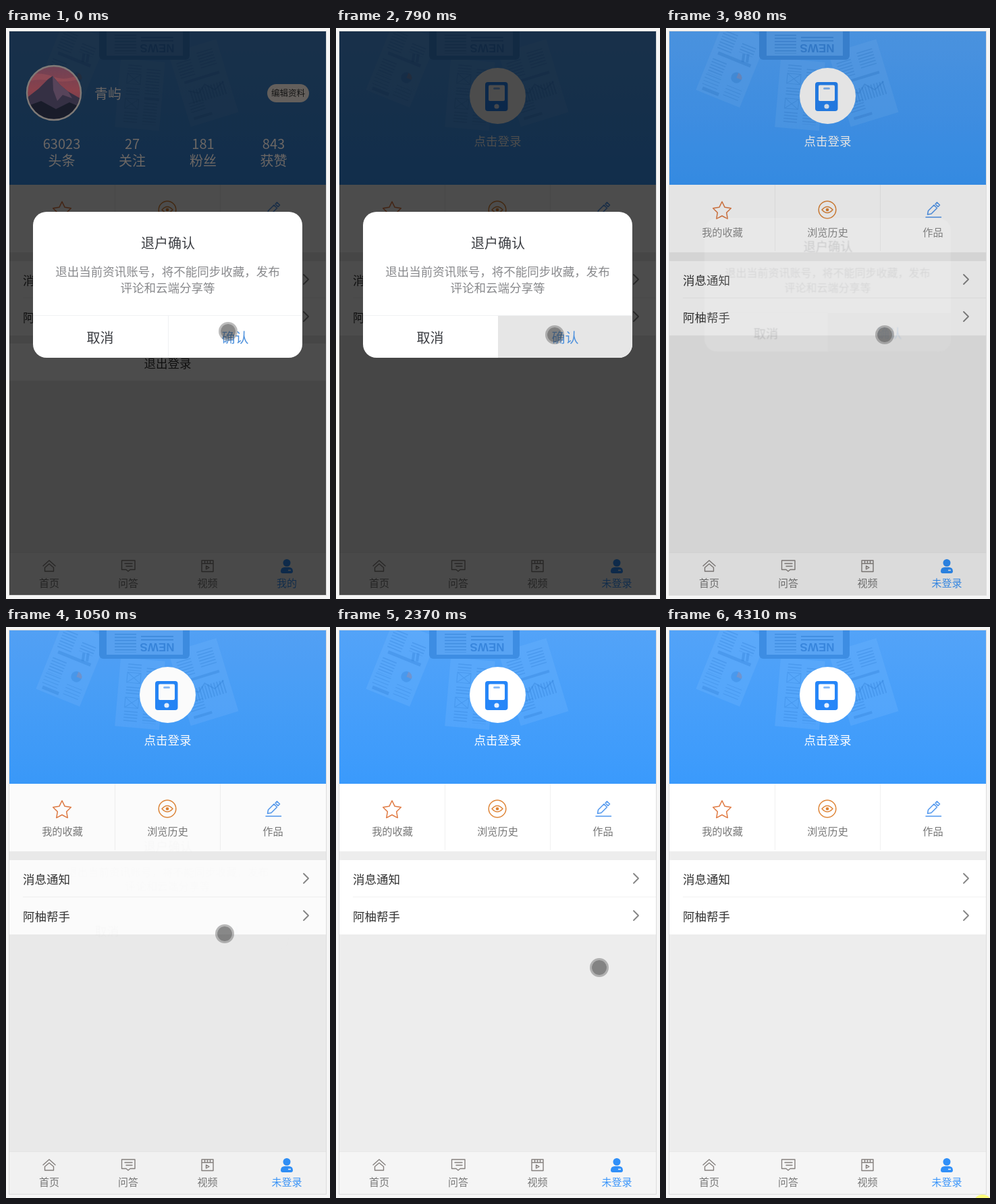
These frames come from a looping animation (480 px wide and 845 px high, 4390 ms). An HTML page:

```html
<!DOCTYPE html>
<html lang="zh-CN">
<head>
<meta charset="utf-8">
<title>Sign out</title>
<style>
html, body { margin: 0; width: 100%; height: 100%; overflow: hidden; background: #f6f6f6; }
svg { display: block; width: 100vw; height: 100vh; }
/* y of every text is its visual middle */
text {
  font-family: "Noto Sans CJK SC", "Noto Sans CJK", "Noto Sans", sans-serif;
  text-anchor: middle; transform: translateY(.38em);
}
.left { text-anchor: start; }
.s12 { font-size: 12.5px; }
.s15 { font-size: 15.2px; }
.tab { font-size: 15px; }
.s17 { font-size: 17.5px; }
.s20 { font-size: 20px; }
.line { fill: none; stroke-width: 1.5; stroke-linejoin: round; stroke-linecap: round; }

.in, .out, .shade, .dialog, .pressed, .cursor, .glow {
  animation: 4390ms step-end infinite;
}
.in { animation-name: signedIn; }
.out { animation-name: signedOut; }
.shade { animation-name: shade; }
.dialog { animation-name: dialog; transform-origin: 239.5px 380px; }
.pressed { animation-name: pressed; }
.cursor { animation-name: cursor; }
.glow { animation-name: glow; }

@keyframes signedIn { 0% { visibility: visible } 17.995%, 100% { visibility: hidden } }
@keyframes signedOut { 0% { visibility: hidden } 17.995%, 100% { visibility: visible } }
@keyframes pressed { 0% { opacity: 0 } 16.628%, 100% { opacity: 1 } }
@keyframes shade {
  0% { opacity: .7 }
  20.045% { opacity: .38 }
  22.323% { opacity: .105 }
  23.917% { opacity: .015 }
  25.056%, 100% { opacity: 0 }
}
@keyframes dialog {
  0% { opacity: 1; transform: none }
  20.045% { opacity: .5; transform: scale(.952) }
  22.323% { opacity: .15; transform: scale(.915) }
  23.917% { opacity: .02; transform: scale(.902) }
  25.056%, 100% { opacity: 0; transform: scale(.9) }
}
@keyframes cursor {
  0% { transform: translate(329px, 449px) }
  1.594% { transform: translate(328px, 450px) }
  3.416% { transform: translate(326px, 452px) }
  6.378% { transform: translate(324px, 454px) }
  53.986% { transform: translate(390px, 504px) }
  55.58% { transform: translate(437px, 539px) }
  57.403%, 100% { transform: translate(-40px, -40px) }
}
@keyframes glow {
  0% { transform: translate(-40px, -40px) }
  86.104% { transform: translate(491px, 842px) }
  87.471% { transform: translate(492px, 843px) }
  89.066% { transform: translate(-40px, -40px) }
  98.177%, 100% { transform: translate(469px, 854px) }
}
</style>
</head>
<body>
<svg viewBox="0 0 480 845" preserveAspectRatio="none">
  <defs>
    <linearGradient id="sky" x2="0" y2="1">
      <stop stop-color="#53a3f8"/><stop offset="1" stop-color="#3a9afc"/>
    </linearGradient>
    <linearGradient id="dusk" x2="0" y2="1">
      <stop stop-color="#6d4256"/><stop offset=".45" stop-color="#8a414b"/><stop offset="1" stop-color="#59394c"/>
    </linearGradient>
    <clipPath id="top"><path d="M5 5H474V232H5z"/></clipPath>
    <clipPath id="face"><circle cx="71" cy="96" r="40"/></clipPath>
    <clipPath id="card"><rect x="40" y="272" width="399" height="216" rx="20"/></clipPath>
    <path id="chevron" class="line" d="M441 -7l7 7l-7 7" stroke="#858585" style="stroke-width:1.8"/>
  </defs>

  <rect width="480" height="845" fill="#f6f6f6"/>
  <rect x="4" y="4" width="471" height="836" fill="#dcdcdc"/>
  <rect x="5" y="5" width="469" height="834" fill="#ededed"/>

  <!-- header backdrop -->
  <g clip-path="url(#top)">
    <rect x="5" y="5" width="469" height="227" fill="url(#sky)"/>
    <g fill="#6fb3fb" fill-opacity=".33" stroke="#2f7fd6" stroke-opacity=".34">
      <g transform="translate(78 8) rotate(22)">
        <rect y="-20" width="70" height="110" stroke="none"/>
        <path d="M17 -8V22M17 37V60" stroke-width="22" stroke-dasharray="1.5 3"/>
        <path d="M10 27H62M8 84H34" stroke-width="5"/>
        <path d="M49 0V14" stroke-width="22" stroke-dasharray="1.5 3"/>
        <path d="M46 14l3 12M52 12l3 12" stroke-width="4"/>
        <path d="M17 62V78M52 66V84" stroke-width="24" stroke-dasharray="1 4"/>
        <circle cx="49" cy="51" r="8" fill="#2f7fd6" fill-opacity=".34" stroke="none"/>
        <path d="M49 51V43A8 8 0 0 1 57 51z" fill="#9a8fb0" fill-opacity=".5" stroke="none"/>
      </g>
      <g transform="translate(170 45) rotate(5)">
        <rect width="66" height="102" stroke="none"/>
        <path d="M12 21h20v15H12zl20 15M32 21L12 36M12 58h20v15H12zl20 15M32 58L12 73" fill="none"/>
        <path d="M22 8V18M22 42V54M22 78V95" stroke-width="20" stroke-dasharray="1.5 3"/>
        <path d="M50 12V50M50 62V94" stroke-width="20" stroke-dasharray="1.5 3"/>
        <path d="M40 56H62" stroke-width="4"/>
      </g>
      <g transform="translate(248 62) rotate(-17)">
        <rect y="-25" width="74" height="113" stroke="none"/>
        <path d="M18 -8V18M18 54V70" stroke-width="22" stroke-dasharray="1.5 3"/>
        <path d="M52 -14V10" stroke-width="24" stroke-dasharray="1.5 3"/>
        <path d="M10 23H64M8 78H36" stroke-width="4"/>
        <path d="M14 47h52" stroke-width="20" stroke-dasharray="2 2.5"/>
        <path d="M12 36l14 8l12 -10l12 12l16 -8" fill="none" stroke-width="2"/>
      </g>
    </g>
    <rect x="138" y="-30" width="134" height="77" rx="6" fill="#3d8de3"/>
    <path d="M149 0H262V41H149z" fill="#58a3f3"/>
    <path d="M177 10V38" stroke="#428fe2" stroke-width="32" stroke-dasharray="1.6 3"/>
    <path d="M224 13V21" stroke="#428fe2" stroke-width="48" stroke-dasharray="2 3"/>
    <g transform="translate(224 30) rotate(180)">
      <text style="font:bold 17px 'Liberation Sans',Arial,sans-serif" fill="#3886dd">NEWS</text>
    </g>
  </g>

  <g class="out">
    <circle cx="239.5" cy="100.5" r="41.5" fill="#fff"/>
    <rect x="221" y="80" width="33.5" height="43" rx="4" fill="#2686f8"/>
    <rect x="226" y="84.5" width="24" height="23.5" rx="2" fill="#fff"/>
    <rect x="233" y="88" width="10" height="3" rx="1.5" fill="#8bbcf8"/>
    <circle cx="238" cy="116" r="3.6" fill="#e4f0ff"/>
    <text class="s17" x="239.5" y="167" fill="#fff">点击登录</text>
  </g>

  <!-- shortcuts -->
  <path d="M5 232H474V332H5z" fill="#fff"/>
  <path d="M161.5 232V330M317.5 232V330" stroke="#f1f1f1"/>
  <path class="line" stroke="#e07a42" d="M83 257l4.1 8.3l9.2 1.4l-6.6 6.5l1.5 9.1L83 278l-8.2 4.3l1.5 -9.1l-6.6 -6.5l9.2 -1.4z"/>
  <g class="line" stroke="#df8639">
    <circle cx="239" cy="269" r="12.8"/>
    <path d="M231 269Q239 260 247 269Q239 278 231 269z"/>
    <circle cx="239" cy="269" r="1.6" fill="#df8639"/>
  </g>
  <path class="line" stroke="#5097ee" d="M385 280H407.500M387.500 276L388.500 270.500L397 262L401.500 266.500L393 275zM399 260.500L401.500 258L405.500 262L403 264.500z"/>
  <g class="s15" fill="#777">
    <text x="83.500" y="302.500">我的收藏</text>
    <text x="239.500" y="302.500">浏览历史</text>
    <text x="395.500" y="302.500">作品</text>
  </g>

  <!-- list -->
  <path d="M5 345H474V455H5z" fill="#fff"/>
  <path d="M25 399.500H474" stroke="#f2f2f2"/>
  <g class="s17" fill="#333">
    <text class="left" x="25" y="373">消息通知</text>
    <text class="left" x="25" y="428">阿柚帮手</text>
  </g>
  <use href="#chevron" y="372"/>
  <use href="#chevron" y="427"/>
  <g class="in">
    <path d="M5 467H474V522H5z" fill="#fff"/>
    <text class="s17" x="239.500" y="496" fill="#333">退出登录</text>
  </g>

  <!-- tab bar -->
  <path d="M5 777H474V839H5z" fill="#f5f5f5"/>
  <path d="M5 776.500H474" stroke="#e8e8e8"/>
  <g class="line" stroke="#85807e" style="stroke-width:1.4">
    <path d="M55 796L64 788L73 796M57.500 798.500L64 793L70.500 798.500V804H57.500z"/>
    <path d="M171.500 788H191V801.500H184L181 804L178 801.500H171.500zM176 792.500H187M178 796.500H187"/>
    <path d="M290 788H307V804.500H290zM290 792.500H307M294.500 788V792.500M298.500 788V792.500M302.500 788V792.500M296.500 796L301 798.500L296.500 801z"/>
  </g>
  <circle cx="416" cy="791.500" r="5.500" fill="#2f8ff8"/>
  <path d="M407 804Q407 798 413 798H419Q425 798 425 804Q425 807 422 807H410Q407 807 407 804z" fill="#2f8ff8"/>
  <path d="M418 802.500H422" stroke="#f5f5f5" stroke-width="1.500"/>
  <g class="tab" fill="#777">
    <text x="64" y="821.500">首页</text>
    <text x="181" y="821.500">问答</text>
    <text x="298.500" y="821.500">视频</text>
    <g fill="#3a95fa">
      <text class="in" x="416" y="821.500">我的</text>
      <text class="out" x="416" y="821.500">未登录</text>
    </g>
  </g>

  <rect class="shade" x="5" y="5" width="469" height="834"/>

  <!-- signed-in header, in its dimmed colours -->
  <g class="in">
    <g clip-path="url(#face)">
      <path d="M30 55H113V138H30z" fill="url(#dusk)"/>
      <path d="M30 70Q50 64 70 72T113 66V74Q90 82 68 78T30 80z" fill="#a05358" opacity=".5"/>
      <path d="M30 104L48 90L62 76L69 71L80 84L92 94L113 106V138H30z" fill="#353044"/>
      <path d="M69 71L80 84L92 94L98 104L84 99L76 108L70 92z" fill="#57445a"/>
      <path d="M30 116L52 108L74 120L94 110L113 118V138H30z" fill="#191c2a"/>
    </g>
    <circle cx="71" cy="96" r="40" fill="none" stroke="#7f7a77" stroke-width="2.400"/>
    <rect x="387" y="83" width="62" height="27" rx="13.500" fill="#635f5c"/>
    <text class="s12" x="418" y="96.500" fill="#161616">编辑资料</text>
    <g class="s20" fill="#6c6764">
      <text class="left" x="131" y="97.500">青屿</text>
      <text x="82.500" y="171">63023</text><text x="82.500" y="196">头条</text>
      <text x="187" y="171">27</text><text x="187" y="196">关注</text>
      <text x="292" y="171">181</text><text x="292" y="196">粉丝</text>
      <text x="396.500" y="171">843</text><text x="396.500" y="196">获赞</text>
    </g>
  </g>

  <g class="dialog">
    <g clip-path="url(#card)">
      <path d="M40 272H439V488H40z" fill="#fff"/>
      <path d="M40 425.500H439M240.500 426V488" stroke="#f0f1f3"/>
      <path class="pressed" d="M240 426H439V488H240z" fill="#e6e6e6"/>
    </g>
    <text class="s20" x="240" y="318.500" fill="#3b3d42">退户确认</text>
    <g class="s17" fill="#88898c">
      <text x="239.500" y="360.500">退出当前资讯账号，将不能同步收藏，发布</text>
      <text x="239.500" y="384.500">评论和云端分享等</text>
    </g>
    <text class="s20" x="139.500" y="458.500" fill="#3b3d42">取消</text>
    <text class="s20" x="339.500" y="458.500" fill="#4c90dc">确认</text>
  </g>

  <g class="cursor">
    <circle r="12.500" fill="none" stroke="#555" stroke-opacity=".4" stroke-width="3"/>
    <circle r="11" fill="#3c3c3c" fill-opacity=".6"/>
  </g>
  <circle class="glow" r="14" fill="#ffff6e" fill-opacity=".9"/>
</svg>
</body>
</html>
```
